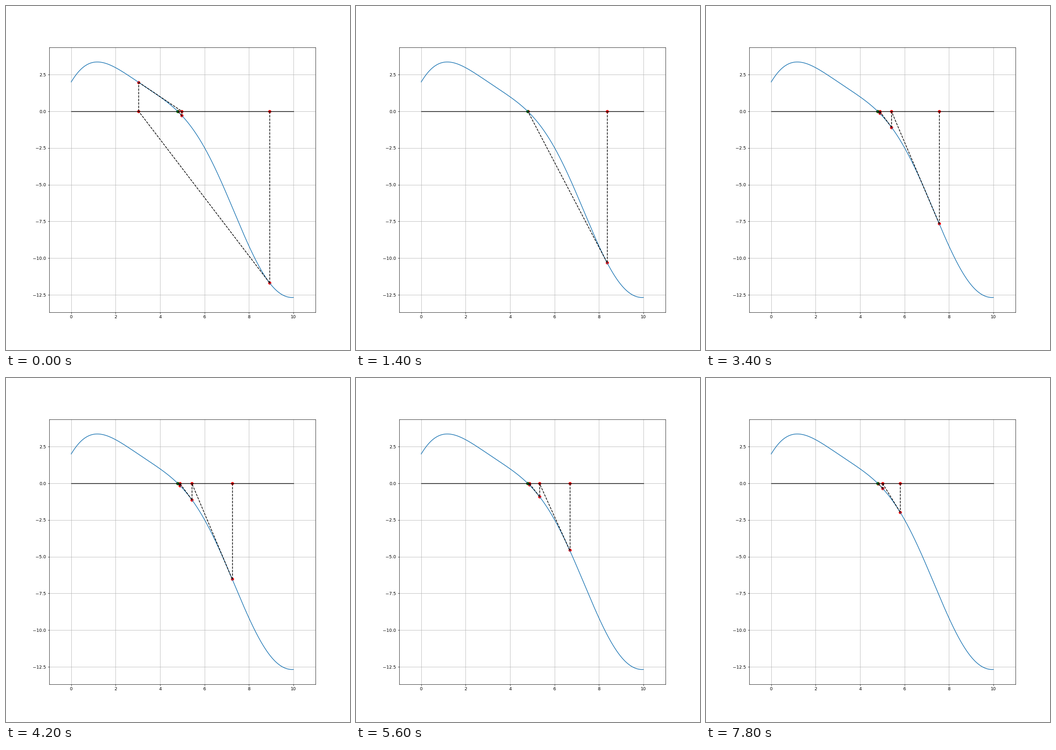
A matplotlib script that plays this animation: 748x748 px, repeating every 8000 ms.

```python
import numpy as np
import matplotlib.pyplot as plt
from matplotlib.animation import FuncAnimation

FRAMES = 40
START, STEP = 8.92, 0.08
TOL = 1e-3


def f(x):
    return 2 - x + 4 * np.sin(x / 2) + np.cos(x) - np.exp(-1.5 * x) * np.cos(x)


def slope(x):
    decay = np.exp(-1.5 * x) * (1.5 * np.cos(x) + np.sin(x))
    return -1 + 2 * np.cos(x / 2) - np.sin(x) + decay


def newton(x):
    """Iterates of Newton's method, ending at the root."""
    xs = [x]
    while abs(f(xs[-1])) > TOL and len(xs) < 12:
        xs.append(xs[-1] - f(xs[-1]) / slope(xs[-1]))
    return xs


fig, ax = plt.subplots(figsize=(11, 11), dpi=68)
x = np.linspace(0, 10, 1000)
y = f(x)
ax.plot(x, y)
ax.plot([0, 10], [0, 0], "k")
ax.set_xlim(-1, 11)
ax.set_ylim(y.min() - 1, y.max() + 1)
ax.grid()

dots = ax.scatter([], [], c="red")
root = ax.scatter([], [], c="green")
drops = [ax.plot([], [], "k--")[0] for _ in range(12)]
tangents = [ax.plot([], [], "k--")[0] for _ in range(12)]


def update(i):
    xs = newton(START - STEP * i)
    points = [(a, b) for a in xs[:-1] for b in (0, f(a))]
    dots.set_offsets(points)
    root.set_offsets([(xs[-1], 0)])
    for line in drops + tangents:
        line.set_data([], [])
    for a, b, drop, tangent in zip(xs, xs[1:], drops, tangents):
        drop.set_data([a, a], [0, f(a)])
        tangent.set_data([a, b], [f(a), 0])
    return [dots, root, *drops, *tangents]


anim = FuncAnimation(fig, update, frames=FRAMES, interval=200, repeat=True,
                     repeat_delay=0)
plt.show()
```
